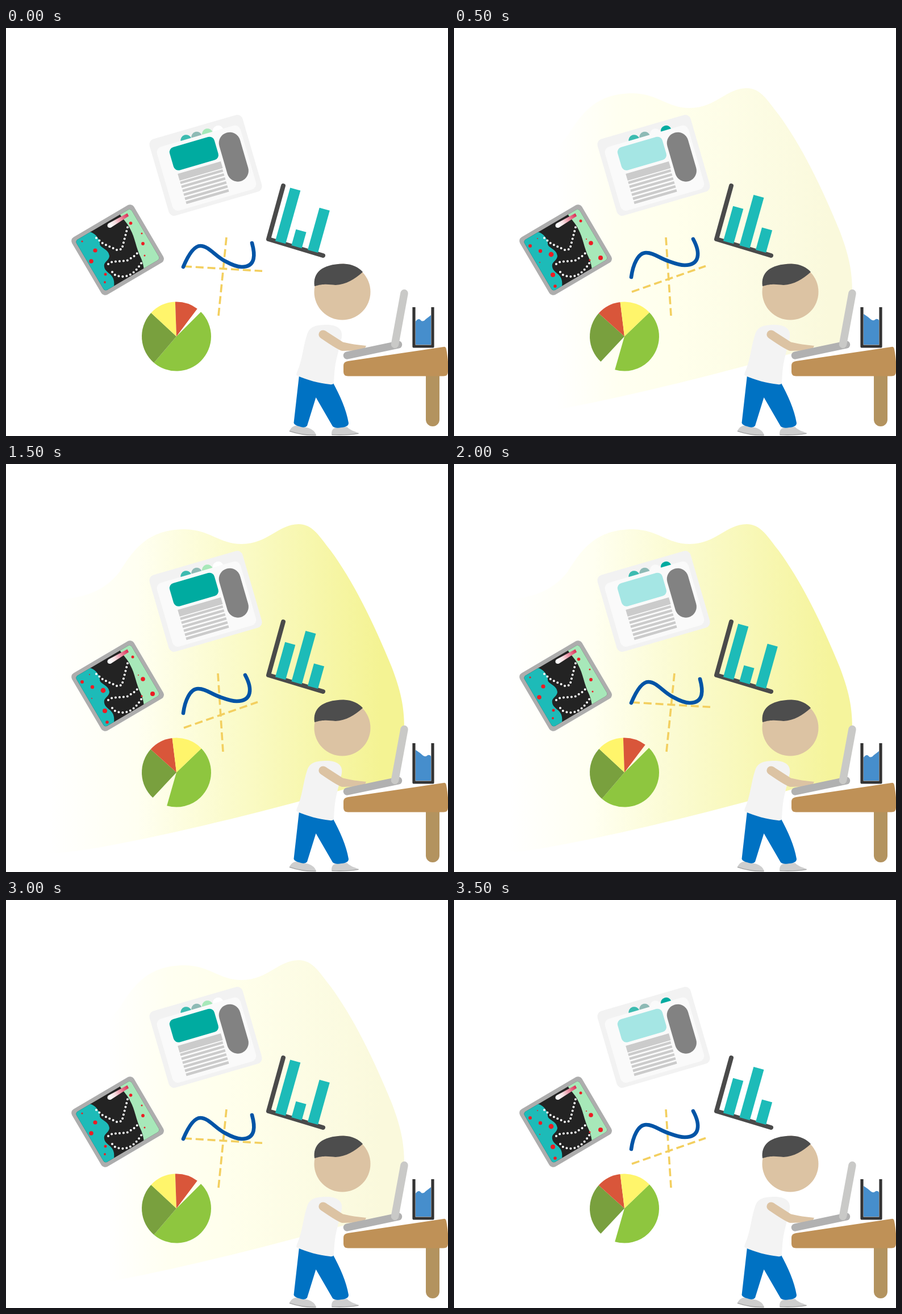
An HTML page with a canvas for the animation above (4000 ms loop, 778 by 719 pixels).

```html
<!DOCTYPE html>
<html>
<head>
<meta charset="utf-8">
<style>
html, body { margin: 0; width: 100%; height: 100%; overflow: hidden; background: #fff; }
canvas { display: block; }
</style>
</head>
<body>
<canvas id="stage" width="778" height="719"></canvas>
<script>
const ctx = document.getElementById('stage').getContext('2d');
const STEP = 500, STEPS = 8;
const TEAL = '#1dbbb8', MINT = '#a7e8b9', SKIN = '#dcc3a3';
const rad = deg => deg * Math.PI / 180;

function fill(path, color) {
  ctx.fillStyle = color;
  ctx.fill(new Path2D(path));
}

function stroke(path, color, width, cap = 'round', dash = []) {
  ctx.save();
  ctx.strokeStyle = color;
  ctx.lineWidth = width;
  ctx.lineCap = cap;
  ctx.lineJoin = 'round';
  ctx.setLineDash(dash);
  ctx.stroke(new Path2D(path));
  ctx.restore();
}

function disc(x, y, r, color) {
  ctx.fillStyle = color;
  ctx.beginPath();
  ctx.arc(x, y, r, 0, 7);
  ctx.fill();
}

function box(x, y, w, h, r, color) {
  ctx.fillStyle = color;
  ctx.beginPath();
  ctx.roundRect(x, y, w, h, r);
  ctx.fill();
}

function turned(x, y, deg, draw) {
  ctx.save();
  ctx.translate(x, y);
  ctx.rotate(rad(deg));
  draw();
  ctx.restore();
}

// Beam brightness: where it fades out, its middle tone and its tone at the screen
const WEAK = [180, 'rgb(255,255,236)', 'rgb(250,249,220)'];
const MEDIUM = [118, 'rgb(252,252,214)', 'rgb(246,245,165)'];
const BRIGHT = [98, 'rgb(251,251,209)', 'rgb(245,244,156)'];
const FULL = [76, 'rgb(251,251,204)', 'rgb(244,243,147)'];
const BEAM = [null, WEAK, MEDIUM, FULL, BRIGHT, MEDIUM, WEAK, null];

function drawBeam(level) {
  if (!level) return;
  const [start, middle, end] = level;
  const half = (390 - start) / (660 - start);
  const shade = ctx.createLinearGradient(start, 0, 660, 0);
  shade.addColorStop(0, '#fff');
  shade.addColorStop(half / 2, '#fffff1');
  shade.addColorStop(half, middle);
  shade.addColorStop(1, end);
  fill(`M60 240C130 240 170 228 200 190C225 150 250 115 315 115
    C360 116 375 141 415 141C460 141 480 106 515 106C540 106 552 128 571 152
    C611 206 647 280 679 358C694 398 701 425 701 466L684 560L600 572
    C470 608 320 646 200 669C150 679 100 686 60 688Z`, shade);
}

// Each page: card colour, then the four tabs
const OPEN = '#fafafa';
const PAGES = [
  ['#00aba0', '#3dbbb0', '#8ebab5', MINT, '#fff'],
  ['#a5e6e4', '#3dbbb0', '#8ebab5', OPEN, '#00aba0'],
  ['#93bab5', '#3dbbb0', OPEN, '#a5e6e4', '#00aba0']
];

function drawPage([card, ...tabs]) {
  turned(351.5, 242, -16.2, () => {
    box(-85.3, -70.3, 170.6, 140.6, 10, '#f2f2f2');
    tabs.forEach((color, i) => disc(-20.8 + i * 19.6, -52, 9.7, color));
    box(-76.5, -53.5, 153, 117, 10, OPEN);
    box(-55, -46.8, 82, 42.2, 9, card);
    box(32.5, -45, 38, 89, 19, '#828282');
    box(-51.5, 0.6, 79, 12.5, 0, '#cbcbcb');
    for (let i = 0; i < 6; i++) box(-51.5, 15 + i * 7.3, 78, 4.5, 0, '#cbcbcb');
  });
}

const SPOTS = [
  [[134, 376, 1.6], [157, 392, 3.6], [150, 411, 3.8], [175, 434, 2.5], [174, 448, 1.9],
   [219.5, 344, 2.8], [239, 362, 1.5], [241, 380, 2.9], [244, 401, 1.5]],
  [[134, 384, 3], [147, 371, 1], [152, 393, 3.2], [171, 399, 4.4], [151, 413, 1],
   [174, 435, 4], [178, 455, 2.8], [223, 340, 2.5], [233, 372, 1], [241, 379, 3.8],
   [239, 409, 1.6], [258, 405, 4]]
];

function drawMap(spots) {
  ctx.save();
  turned(196.5, 391, -30.5, () => box(-63.3, -58.8, 126.6, 117.6, 8, '#adadad'));
  ctx.translate(196.5, 391);
  ctx.rotate(rad(-30.5));
  ctx.beginPath();
  ctx.roundRect(-56.5, -51.5, 113, 103, 5);
  ctx.rotate(rad(30.5));
  ctx.translate(-196.5, -391);
  ctx.clip();
  fill('M100 300H290V480H100Z', '#232323');
  fill(`M110 360L150 360C158 363 165 372 165 380C165 388 181 389 182 402
    C181 411 171 412 173 421C175 432 188 432 190 446C191 455 190 461 184 466L160 480L100 380Z`, TEAL);
  fill('M200 328C207 338 214 344 219 355C227 369 229 388 237 404Q241 412 243 426L290 410L220 310Z', MINT);
  const legend = ctx.createLinearGradient(182, 348, 215, 329);
  legend.addColorStop(0, '#fff');
  legend.addColorStop(0.3, '#f6dfe2');
  legend.addColorStop(1, '#dc2a52');
  fill('M181 344L213.5 326.5L216 331.5L185 351.5C179 354 176 347 181 344Z', legend);
  for (const route of [
    'M159 370L171 380L196 391.5L204 389.5L215 347',
    'M180 416L187 412L213 410L225 402.5L232 396',
    'M187 430C190 436 198 438 207 438C220 437 230 428 241 410'
  ]) stroke(route, '#fff', 4, 'round', [0, 7]);
  for (const [x, y, r] of spots) disc(x, y, r, '#ed1c24');
  ctx.restore();
}

const BARS = [[97.5, 29.5, 77], [64, 92.5, 41]];

function drawBars(heights) {
  stroke('M488 278L462 372L558 401', '#4a4a4a', 8);
  heights.forEach((h, i) =>
    turned(474 + i * 28.5, 375.3 + i * 7.8, 15.6, () => box(0, -h, 18.8, h, 0, TEAL)));
}

const GRAPHS = [
  ['M388 369L374 507', 'M313 420L451 428.3',
   `M312 421C320 402 330 384 342 384C357 384 368 402 386 411
    C397 417 406 421 415 421C441 421 438 397 433 379`],
  ['M373 369L382 507', 'M313 465L443 419.5',
   `M312 439C315 417 324 396 338 396C352 396 362 406 378 411
    C389 415 397 418 406 418C433 418 434 396 421 372`]
];

function drawGraph([vertical, horizontal, curve]) {
  for (const axis of [vertical, horizontal]) stroke(axis, '#f3cf5f', 3.6, 'butt', [14, 6.8]);
  stroke(curve, '#0054a6', 6.6);
}

// Slices: start angle, end angle, colour
const LIME = '#8ec63f', OLIVE = '#79a03e', YELLOW = '#fff56b', RED = '#d9563a';
const PIES = [
  [[-45, 130.5, LIME], [130.5, 223, OLIVE], [223, 268, YELLOW], [268, 307, RED]],
  [[-44, 106, LIME], [133, 222, OLIVE], [222, 263, RED], [263, 316, YELLOW]]
];

function drawPie(slices) {
  for (const [from, to, color] of slices) {
    ctx.fillStyle = color;
    ctx.beginPath();
    ctx.moveTo(300, 543.5);
    ctx.arc(300, 543.5, 61, rad(from), rad(to));
    ctx.fill();
  }
}

function drawPerson() {
  fill('M499 710C502 703 508 700 514 701L529 704C538 706 543 710 546 717Q521 718 499 710Z', '#cecece');
  stroke('M499.5 710.5Q521 718 545 717.5', '#a8a8a8', 1.6);
  fill('M573 716C573 707 577 704 584 704L600 703C606 709 614 711 621 714Q600 718 573 716Z', '#cecece');
  stroke('M574 716.8Q600 718 620 714.5', '#a8a8a8', 1.6);
  fill(`M516 612L575 624C588 648 599 672 603 696Q603 703 590 704Q580 706 575 702
    L545.5 651L530 701Q526 706 516 702Q508 700 506.5 696Z`, '#0072c3');
  fill(`M530 540C535 524 549 523 567 523C585 524 593 532 591 545L583 578
    C578 597 578 610 577 625Q576 629 570 628C550 626 530 620 513 613Q510 612 512 607
    C522 585 523 560 530 540Z`, '#f3f3f3');
  disc(592, 465, 49.5, SKIN);
  fill(`M543 455C540 432 555 416 594 415.5C610 416 621 422 628 430
    C613 443 599 452 580 453C568 452 560 450 543 455Z`, '#4d4d4d');
  disc(558, 540, 7.6, SKIN);
  fill('M562 533.5L593 553.5Q612 558 634 560L630 568L592 569Q585 568 554 546.5Z', SKIN);
}

function drawDesk() {
  stroke('M600.5 577L690.5 558', '#b1b1b1', 13.5);
  stroke('M701 467.5L684.5 557.5', '#c9c9c7', 13.5);
  box(739, 590, 24, 112, 12, '#b3935f');
  fill(`M602 587L770 562Q774 561 775 566C778 582 779 595 778 606Q778 613.5 770 613.5
    H602Q594 613.5 594 606V595Q594 588 602 587Z`, '#bf9157');
}

const WATER = [
  'M721 517C725 512 728 512 731 516Q735 518 739 513Q743 510 748 506V558H721Z',
  'M721 504Q729 509 733 513Q738 517 741 514Q745 511 748 515V558H721Z'
];

function drawGlass(water) {
  fill(water, '#468ecc');
  stroke('M718 492V561H751V492', '#333', 5.2, 'butt');
}

function draw(step) {
  const pose = step % 2;
  ctx.fillStyle = '#fff';
  ctx.fillRect(0, 0, 778, 719);
  drawBeam(BEAM[step]);
  drawPage(PAGES[step % 3]);
  drawMap(SPOTS[pose]);
  drawBars(BARS[pose]);
  drawGraph(GRAPHS[pose]);
  drawPie(PIES[pose]);
  drawPerson();
  drawDesk();
  drawGlass(WATER[pose]);
}

const begin = performance.now();
function tick() {
  draw(Math.floor((performance.now() - begin) / STEP) % STEPS);
  requestAnimationFrame(tick);
}
tick();
</script>
</body>
</html>
```
